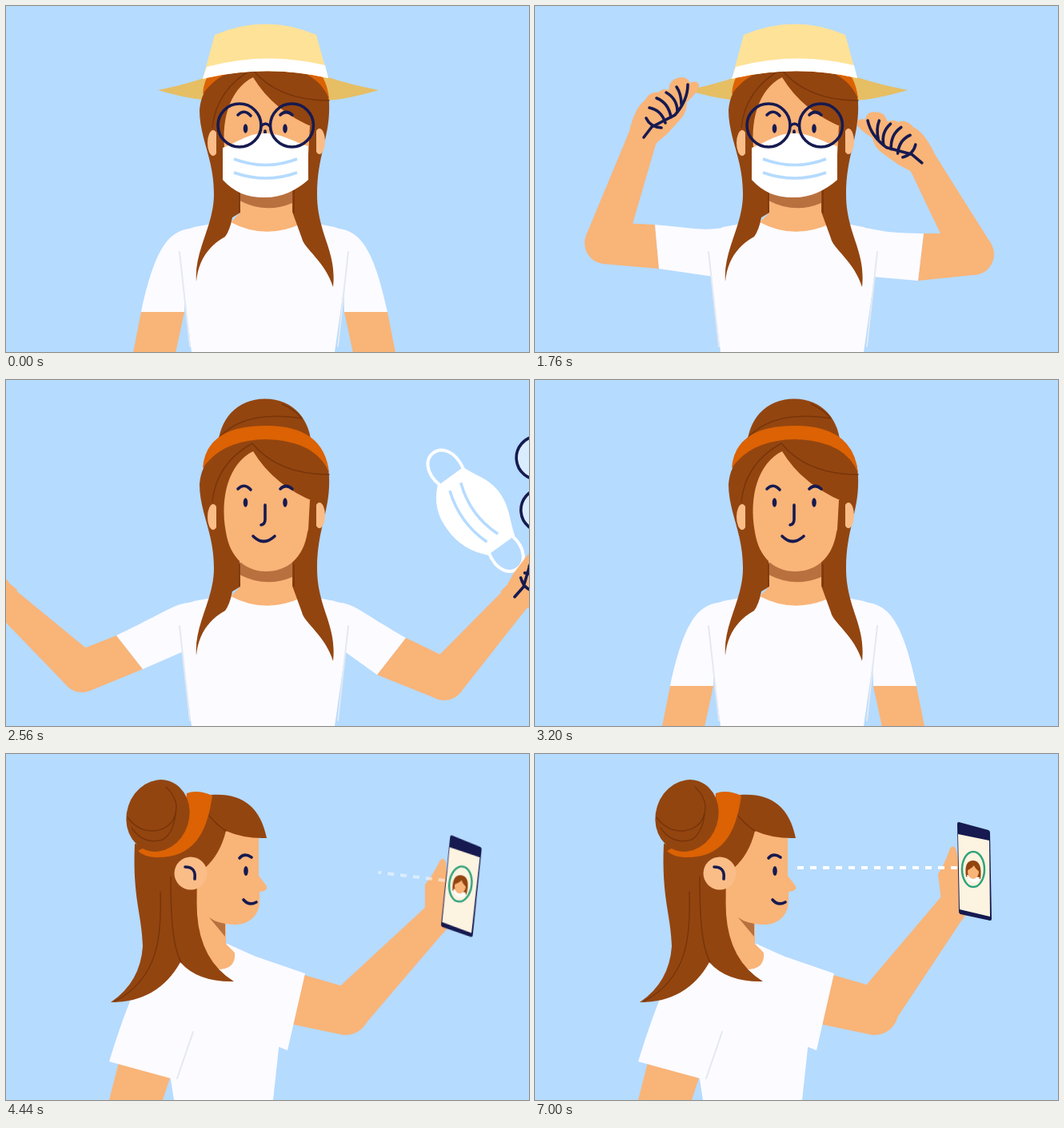
Write an HTML page that moves like this. It is 654 by 432 pixels and loops after 7.04 s.

```html
<!DOCTYPE html>
<html lang="en">
<head>
<meta charset="utf-8">
<title>Selfie check</title>
<style>
  html, body { margin: 0; width: 100%; height: 100%; overflow: hidden; background: #b5dbff; }
  svg { display: block; }
  .skin { fill: #f9b478; }
  .ear { fill: #fbbd87; }
  .shade { fill: #b8703f; }
  .hair { fill: #934510; }
  .band { fill: #dc6203; }
  .shirt { fill: #fcfbff; }
  .navy { fill: #161a50; }
  .ink, .strand, .seam { fill: none; stroke: #161a50; stroke-width: 3.6; stroke-linecap: round; stroke-linejoin: round; }
  .strand { stroke: #783509; stroke-width: 1.5; }
  .seam { stroke: #e4e9f1; stroke-width: 2; }
  #glasses { fill: #fff; }
</style>
</head>
<body>
<svg width="654" height="432" viewBox="0 0 654 432">
  <rect width="654" height="432" fill="#b5dbff"/>

  <g id="front">
    <g class="hat"><path fill="#e6be64" d="M190 105Q225 98 250 89Q325 70 403 89Q430 98 466 105Q425 117 400 118Q325 132 245 117Q220 114 190 105Z"/></g>

    <path class="shirt" d="M281 268L235 276Q217 283 215 300L232 432H411L430 300Q428 283 411 276L369 268Z"/>
    <path class="skin" d="M292 220H360L363 258L371 271Q325 293 281 270L293 258Z"/>
    <path class="shade" d="M292 228H358V246Q325 260 292 243Z"/>

    <path class="hair" d="M265 84C266 50 288 23.500 324 23.500C360 23.500 381 50 382 84Z"/>
    <path class="strand" d="M267 71Q300 37 370 48Q360 36 345 30"/>
    <path class="hair" d="M247 110Q252 60 325 60Q400 60 404 120C406 163 389 185 389 235C389 285 414 305 409 351C400 320 372 302 370 290L358 257V225H292L293 258L283 264Q280 280 274 288C252 300 240 320 238 344C235 305 260 275 260 235C260 190 242 165 242 130Q243 118 247 110Z"/>
    <path class="band" d="M246 110Q250 57 325 57Q398 57 404 116Q388 76 325 74Q270 75 246 110Z"/>
    <path class="skin" d="M309 89C279 104 267 145 275 190C280 222 300 239 325 239C352 239 372 222 377 190L388 153Q335 132 309 89Z"/>
    <path class="strand" d="M258 152Q263 104 308 79Q340 118 404 118M292 230V257M360 230V258"/>
    <ellipse class="ear" cx="259" cy="171" rx="7" ry="16"/>
    <ellipse class="ear" cx="392" cy="169" rx="7" ry="16"/>
    <path class="hair" d="M263 145H271L272 205L263 190ZM380 150H388V190L377 205Z"/>

    <ellipse class="navy" cx="299.500" cy="153" rx="2.800" ry="5.800"/>
    <ellipse class="navy" cx="349" cy="153" rx="2.800" ry="5.800"/>
    <path class="ink" d="M290 136Q298 128 306 137M343 136Q350 129 358 136M324 156V174Q324 180 319 181M309 195Q322 208 336 195"/>

    <g id="mask">
      <path id="loops" fill="none" stroke="#fff" stroke-width="4" d="M272 178C222 168 222 226 272 214M376 178C426 168 426 226 376 214"/>
      <path fill="#fff" d="M271 177C287 172 301 159 323 159C346 159 360 170 378 175V217C362 231 345 239 323 239C300 239 285 232 271 217Z"/>
      <path fill="none" stroke="#b5dbff" stroke-width="3.500" d="M285 191Q325 206 364 191M285 208Q325 222 364 208"/>
    </g>
    <g id="glasses" class="ink">
      <circle cx="292" cy="149" r="27"/><circle cx="357.500" cy="149" r="27"/>
      <path d="M319 150Q324.500 144 330 150"/>
    </g>

    <g class="hat">
      <path fill="#fee297" d="M261 36Q325 9 388 36L403 90Q325 72 246 91Z"/>
      <path fill="#fff" d="M251 76Q325 56 399 74L403 90Q325 72 246 91Z"/>
    </g>

    <g id="arms"></g>
    <path class="seam" d="M217 307L230 425M428 307L415 425"/>
  </g>

  <g id="side">
    <path class="skin" d="M148 358L215 374L196 432H129Z"/>
    <path class="skin" d="M342 267L432 293A29 29 0 0 1 418 350L327 331Z"/>
    <g id="reach">
      <path class="skin" d="M401 304L508 178L536 204L447 338A29 29 0 0 1 401 304Z"/>
      <path class="skin" d="M508 183L504 150Q512 138 519 118Q524 112 527 121L540 198L534 208Z"/>
      <path id="dots" fill="none" stroke="#fff" stroke-width="4" d=""/>
      <path class="navy" d="M530 85L567 95Q569 96 569 98L571 206Q571 208 569 208L532 200Q530 199 530 197L528 87Q528 85 530 85Z"/>
      <path fill="#fcf3e0" d="M529 100L568 108L569 203L531 194Z"/>
      <ellipse cx="548" cy="144" rx="14" ry="22" fill="none" stroke="#2fa37c" stroke-width="2.500"/>
      <path class="hair" d="M539 153Q536 133 548 133Q560 134 557 156Z"/>
      <path fill="#fff" d="M540 151L556 154Q555 161 548 160Q541 158 540 151Z"/>
      <ellipse class="skin" cx="548" cy="147" rx="7" ry="9"/>
      <path class="hair" d="M539 146Q540 133 549 134Q557 136 557 148Q550 143 549 139Q546 143 539 146Z"/>
    </g>
    <path class="shirt" d="M175 262L245 235L277 237L310 252L345 300L341 368L334 432H210L205 400Z"/>
    <path class="shirt" d="M292 245L310 252L374 274L352 370L264 335Z"/>
    <path class="shirt" d="M165 285Q147 325 129 384L206 405L234 347L240 290L215 255Z"/>
    <path class="seam" d="M234 347L214 405"/>
    <path class="skin" d="M238 170L275 200V237L286 248Q288 269 264 269L236 250Z"/>
    <path class="shade" d="M254 204L274 210V228Z"/>
    <path class="hair" d="M258 51C205 52 165 90 161 140Q190 172 240 184L250 140L275 96Z"/>
    <path class="skin" d="M240 120L264 92L316 98V152L326 165Q328 171 317 172V183C317 204 301 214 284 213Q264 212 254 204L238 195Z"/>
    <path class="hair" d="M161 112C158 180 170 200 171 240Q168 285 131 310Q190 310 218 260Q240 285 285 284Q243 258 239 200L238 168L214 150L212 122Z"/>
    <path class="hair" d="M256 51C293 48 318 64 326 105Q298 106 275 96Q268 125 249 142L214 140L225 80Z"/>
    <path class="band" d="M226 49Q240 44 258 52C251 102 233 130 187 129Q172 128 165 121L222 90Z"/>
    <ellipse class="hair" cx="190" cy="77" rx="39" ry="45.500" transform="rotate(18 190 77)"/>
    <path class="strand" d="M152 79Q165 97 186 96Q213 92 213 64Q211 51 200 41M157 92Q172 114 196 107Q211 98 213 66M254 77Q264 89 275 96M193 172C195 230 190 280 136 309M206 153C206 200 208 240 219 260"/>
    <circle class="ear" cx="231" cy="149" r="20.500"/>
    <path class="ink" d="M224 141Q238 141 236 156M292 130Q298 123 307 129M297 182Q304 190 313 185"/>
    <ellipse class="navy" cx="300" cy="146" rx="2.800" ry="6"/>
  </g>
</svg>
<script>
const LOOP = 7040, TAU = Math.PI * 2;
const SHOULDER = [212, 308];
const PULL = [2060, 2540];
const $ = s => document.querySelector(s);
const set = (el, attrs) => { for (const k in attrs) el.setAttribute(k, attrs[k]); };
const ramp = (t, a, b) => Math.min(1, Math.max(0, (t - a) / (b - a)));
const ease = (t, a, b) => { const p = ramp(t, a, b); return p * p * (3 - 2 * p); };
const pts = list => list.map(p => p.map(v => v.toFixed(1)).join(' ')).join('L');

// Poses of an arm on the left: hem corners, elbow, wrist. The right arm is mirrored.
const down = [[169, 382], [223, 382], [184, 440], [168, 590]];
const poses = [
  { down, grip: [[150, 273], [155, 328], [88, 296], [136, 160]], out: [[138, 319], [171, 361], [95, 364], [-6, 271]] },
  { down, grip: [[160, 284], [167, 343], [98, 310], [163, 192]], out: [[146, 322], [182, 368], [98, 374], [6, 270]] }
];
const steps = [[750, 'down'], [1620, 'grip'], [PULL[0], 'grip'], [PULL[1], 'out'], [2600, 'out'], [2940, 'down']];

const toPolar = ([x, y], [ox, oy]) => [(Math.atan2(y - oy, x - ox) + TAU) % TAU, Math.hypot(x - ox, y - oy)];
const fromPolar = ([a, r], [ox, oy]) => [ox + r * Math.cos(a), oy + r * Math.sin(a)];
const swing = (p, q, from, to, at, k) => {
  const a = toPolar(p, from), b = toPolar(q, to);
  return fromPolar(a.map((v, i) => v + (b[i] - v) * k), at);
};
const sides = (p, a, w) => {
  const n = [-Math.sin(a) * w, Math.cos(a) * w];
  return [[p[0] + n[0], p[1] + n[1]], [p[0] - n[0], p[1] - n[1]]];
};

const handShape = `<path class="skin" d="M-19 2L-17 -8Q-10 -34 1 -42Q8 -54 18 -52Q24 -58 31 -55Q32 -68 42 -70Q53 -74 58 -64Q67 -68 69 -61Q69 -54 54 -40Q54 -28 47 -20L29 0L17 10L10 20Z"/>
  <path class="ink" d="M0 4L10 -9M3 -20Q8 -9 22 -8M7 -33Q22 -30 27 -14M16 -45Q31 -39 34 -21M28 -52Q42 -44 42 -28M41 -59Q47 -50 47 -37M55 -62Q55 -42 39 -24L10 -9"/>`;

const arms = poses.map((pose, i) => {
  const g = document.createElementNS('http://www.w3.org/2000/svg', 'g');
  if (i) set(g, { transform: 'matrix(-1 0 0 1 646 0)' });
  g.innerHTML = `<path class="skin"/><circle class="skin" r="26"/><path class="shirt"/><g>${handShape}</g>`;
  $('#arms').append(g);
  const [limb, elbow, sleeve, hand] = g.children;
  return t => {
    let n = steps.findIndex(s => t < s[0]);
    if (n < 0) n = steps.length;
    const from = steps[Math.max(0, n - 1)], to = steps[Math.min(n, steps.length - 1)];
    const p = pose[from[1]], q = pose[to[1]];
    const k = from === to ? 0 : ease(t, from[0], to[0]);
    const [A, B, E] = [0, 1, 2].map(j => swing(p[j], q[j], SHOULDER, SHOULDER, SHOULDER, k));
    const W = swing(p[3], q[3], p[2], q[2], E, k);
    const upper = toPolar(E, SHOULDER)[0], fore = toPolar(W, E)[0];
    const [e1, e2] = sides(E, upper, 26), [f1, f2] = sides(E, fore, 26), [w1, w2] = sides(W, fore, 18);
    set(limb, { d: `M${pts([A, e1, e2, B])}ZM${pts([f1, w1, w2, f2])}Z` });
    set(elbow, { cx: E[0], cy: E[1] });
    const reach = 0.72 * Math.hypot(A[0] - 240, A[1] - 275);
    const c = fromPolar([upper, -reach], A);
    set(sleeve, { d: `M235 277C208 280 ${pts([c])} ${pts([A, B])}L224 338L233 318Z` });
    set(hand, { transform: `translate(${W}) rotate(${1.3 * (fore * 360 / TAU - 289.4)})` });
  };
});

function draw(t) {
  arms.forEach(arm => arm(t));

  // Hat, glasses and mask come off with the hands.
  const off = ease(t, ...PULL), away = 250 * ease(t, 2600, 2800);
  document.querySelectorAll('.hat').forEach(h =>
    set(h, { transform: `translate(${-225 * off - away} ${110 * off}) rotate(${-150 * off} 200 103)` }));
  set($('#glasses'), {
    transform: `translate(${344 * off + away} ${-20 * off}) rotate(${85 * off} 324 149)`,
    'fill-opacity': 0.5 * off
  });
  set($('#mask'), { transform: `translate(${262 * off + away} ${-34 * off}) rotate(${54 * off} 324 198)` });
  set($('#loops'), { opacity: ramp(off, 0, 0.1) });

  // Blend to the profile, whose parts fade one by one.
  const fade = ramp(t, 3480, 3880);
  set($('#front'), { opacity: Math.max(0, 1 - fade * 1.17) });
  set($('#side'), { 'fill-opacity': fade, 'stroke-opacity': fade, visibility: fade ? 'visible' : 'hidden' });

  const k = 1 - ease(t, 3720, 4760);
  set($('#reach'), { transform: `translate(${-k} ${9 * k}) rotate(${31 * k} 424 321)` });

  const length = 200 * ramp(t, 4240, 4720);
  set($('#dots'), { d: `M528 142H${528 - length}`, 'stroke-dasharray': '8 8', opacity: ramp(t, 4240, 4640) });
}

function tick() {
  draw(performance.now() % LOOP);
  requestAnimationFrame(tick);
}
tick();
</script>
</body>
</html>
```
